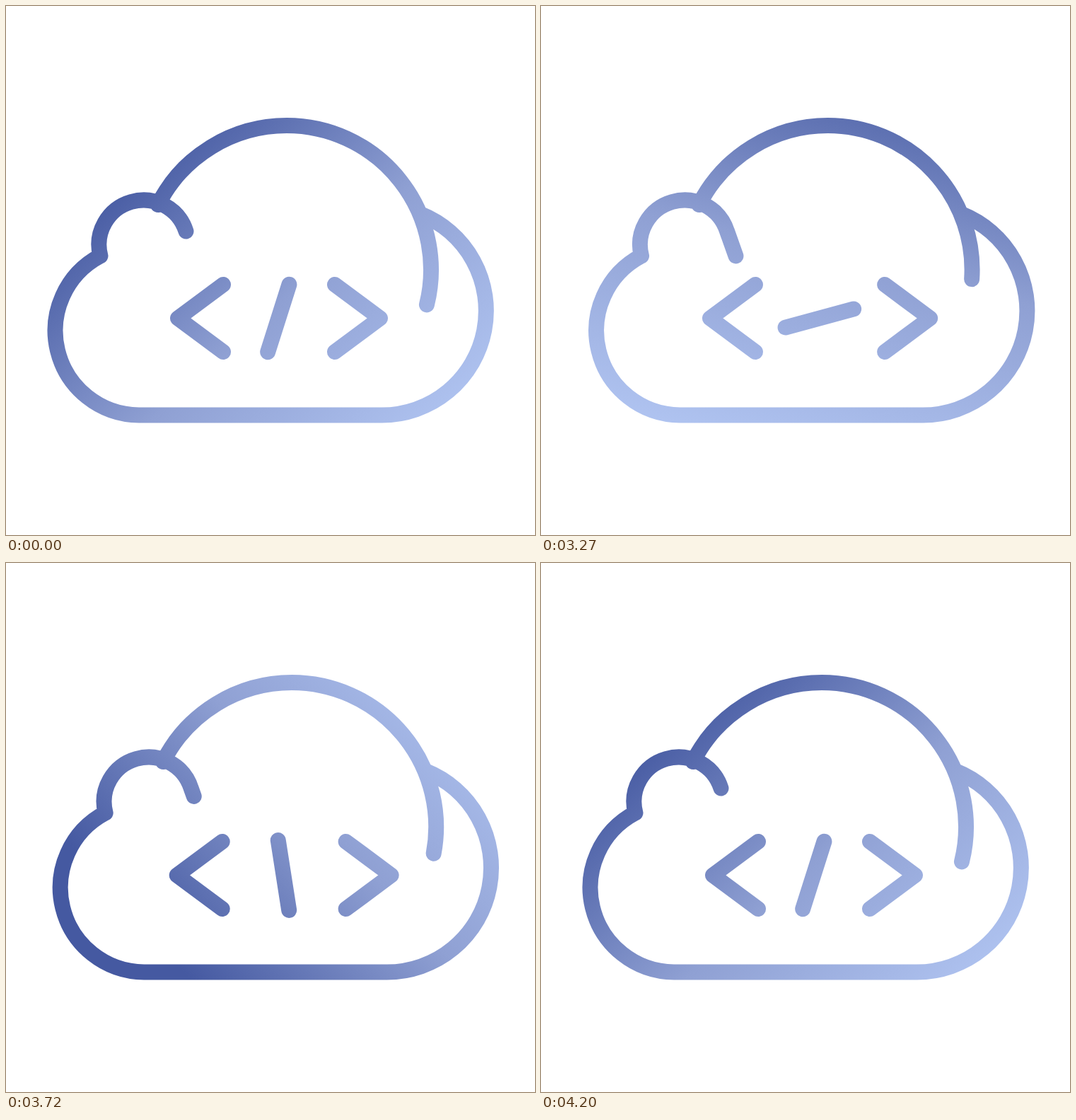
An HTML page that plays this animation: 748 px wide and 748 px high, repeating every 4.23 s.

```html
<!DOCTYPE html>
<html lang="en">
<head>
<meta charset="utf-8">
<title>Code cloud</title>
<style>
  html, body { margin: 0; width: 100%; height: 100%; overflow: hidden; background: #fff; }
  svg { display: block; width: 100%; height: 100%; }
</style>
</head>
<body>
<svg viewBox="0 0 748 748">
  <defs>
    <linearGradient id="ink" gradientUnits="userSpaceOnUse">
      <stop offset="0" stop-color="#4559a1"/>
      <stop offset=".5" stop-color="#8fa0d3"/>
      <stop offset="1" stop-color="#b0c4f1"/>
    </linearGradient>
  </defs>
  <path id="icon" fill="none" stroke="url(#ink)" stroke-width="22" stroke-linecap="round" stroke-linejoin="round"/>
</svg>
<script>
const LOOP = 4230, STEP = 30, START = 3000, SPAN = 1200;
const icon = document.getElementById('icon');
const ink = document.getElementById('ink');
const rad = deg => deg * Math.PI / 180;
const clamp = v => Math.min(1, Math.max(0, v));

function bezier(x1, y1, x2, y2) {
  const at = (s, a, b) => 3 * (1 - s) * (1 - s) * s * a + 3 * (1 - s) * s * s * b + s * s * s;
  return u => {
    if (u <= 0) return 0;
    if (u >= 1) return 1;
    let lo = 0, hi = 1;
    for (let i = 0; i < 30; i++) {
      const mid = (lo + hi) / 2;
      if (at(mid, x1, x2) < u) lo = mid; else hi = mid;
    }
    return at((lo + hi) / 2, y1, y2);
  };
}

// Rises from 0 to 1 until the peak time, then falls back to 0.
function pulse(ms, peak, rise, fall) {
  return ms < peak ? rise(clamp(ms / peak)) : 1 - fall(clamp((ms - peak) / (SPAN - peak)));
}

const snap = bezier(.19, 0, .333, 1);
const turn = bezier(.333, 0, .5, 1);
const driftOut = u => 1 - Math.pow(1 - u, 2.3);
const driftBack = bezier(.333, .2, .667, 1);
const tailIn = bezier(.15, .1, .1, 1);
const tailOut = bezier(.11, 0, .1, 1);

function draw(t) {
  const ms = clamp((t - START) / SPAN) * SPAN;
  const u = ms / SPAN;
  const dx = 10.4 * pulse(ms, 510, driftOut, driftBack);
  const gap = 16 * pulse(ms, 510, snap, snap);
  const tail = pulse(ms, 480, tailIn, tailOut);
  const p = (x, y) => (x + dx).toFixed(2) + ' ' + y.toFixed(2) + ' ';
  const arc = (r, sweep, x, y) => `A${r} ${r} 0 0 ${sweep} ` + p(x, y);

  const body = 'M' + p(133, 353.5) + arc(119.5, 0, 188, 578.5) +
    'L' + p(531.5, 578.5) + arc(147.5, 0, 586, 294);

  const hook = 'M' + p(133.5, 353.5) + arc(63, 1, 254.5, 318.5) +
    'L' + p(254.5 + 13.7 * tail, 318.5 + 38.6 * tail);

  const end = rad(14 - 11.4 * tail);
  const dome = 'M' + p(215, 281) + arc(204, 1, 397, 169) +
    arc(204, 1, 397 + 204 * Math.cos(end), 373 + 204 * Math.sin(end));

  const bracket = (tip, open) => 'M' + p(open, 394) + 'L' + p(tip, 441.5) + 'L' + p(open, 489);

  const tilt = rad(17.6 + 180 * snap(u));
  const sx = 50 * Math.sin(tilt), sy = 50 * Math.cos(tilt);
  const slash = 'M' + p(385.3 + sx, 441.5 - sy) + 'L' + p(385.3 - sx, 441.5 + sy);

  icon.setAttribute('d', body + hook + dome + slash +
    bracket(243 - gap, 307 - gap) + bracket(529 + gap, 465 + gap));

  const a = rad(48 + 360 * turn(u));
  const gx = 290 * Math.cos(a), gy = 290 * Math.sin(a);
  const ends = { x1: 450 - gx, y1: 365 - gy, x2: 450 + gx, y2: 365 + gy };
  for (const k in ends) ink.setAttribute(k, ends[k].toFixed(2));
}

const begin = performance.now();
function tick() {
  const t = (performance.now() - begin) % LOOP;
  draw(Math.floor(t / STEP) * STEP);
  requestAnimationFrame(tick);
}
tick();
</script>
</body>
</html>
```
